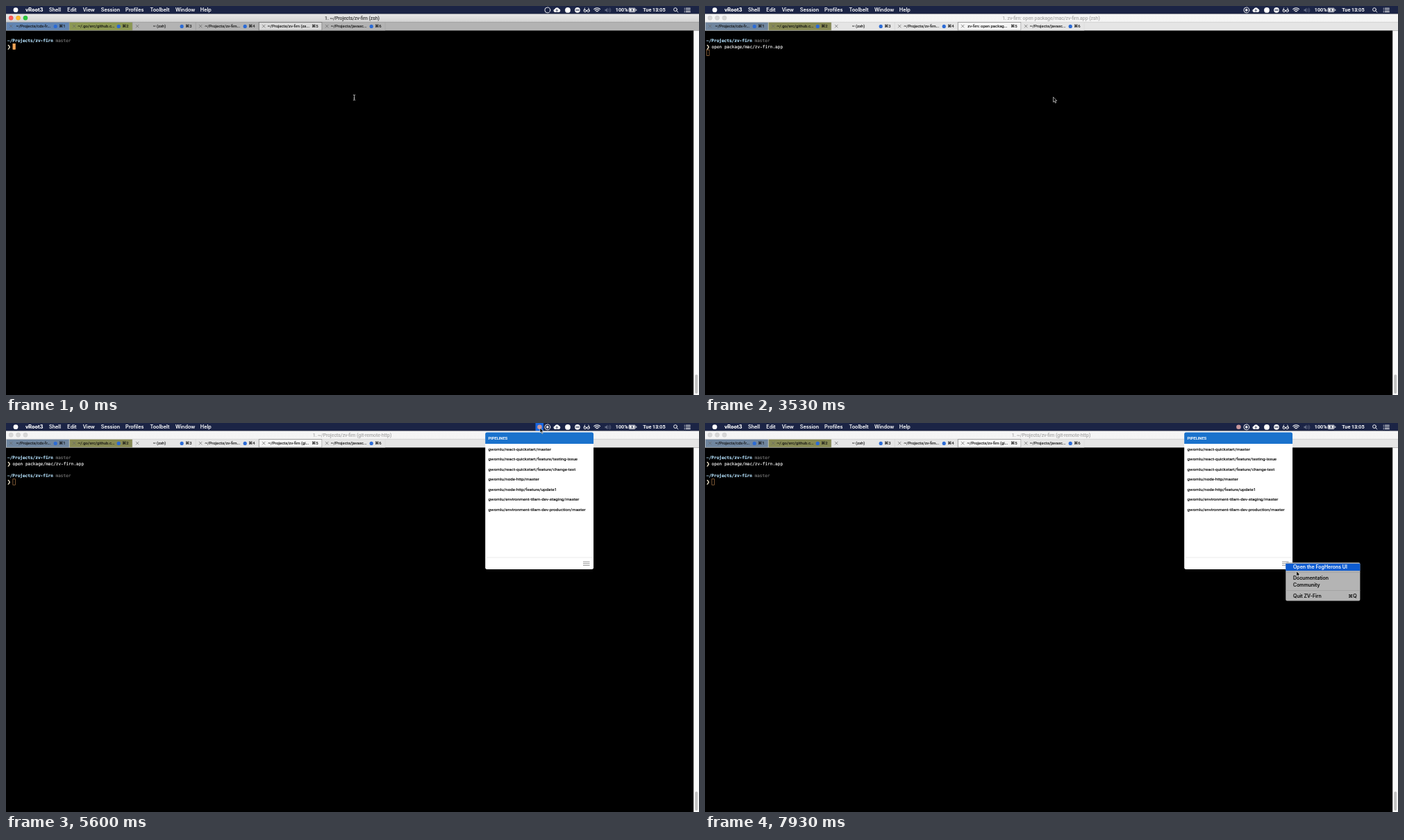
An HTML page for the animation above (8000 ms loop, 998 px wide and 561 px high).

```html
<!DOCTYPE html>
<html lang="en">
<head>
<meta charset="utf-8">
<title>Terminal and tray menu</title>
<style>
  html, body { margin: 0; width: 100%; height: 100%; overflow: hidden; background: #000; }
  svg {
    display: block; width: 100%; height: 100%;
    --bar: #b3b3b3; --selected: #dadada; --edge: #777; --blue: #6285b2; --olive: #8c9853;
    --ink: #303030; --title-top: #e9e9e9; --title-end: #d2d2d2; --gap: #999;
  }
  svg.blur {
    --bar: #e5e5e5; --selected: #f5f5f5; --edge: #999; --blue: #70869f; --olive: #878a55;
    --ink: #a5a5a5; --title-top: #f6f6f6; --title-end: #f4f4f4; --gap: #d0d0d0;
  }
  text { white-space: pre; stroke-width: .14; }
  .menu { font: 500 7.28px Inter, sans-serif; fill: #fff; }
  .menu text { stroke: #fff; }
  .status { font-family: Roboto, sans-serif; }
  .title { font: 6.9px Roboto, sans-serif; fill: var(--ink); stroke: var(--ink); text-anchor: middle; }
  .tabs { font: 5.9px Roboto, "DejaVu Sans", sans-serif; fill: #161616; }
  .tabs text { stroke: #161616; }
  .tabs .label { text-anchor: middle; }
  .term { font: 6.08px "DejaVu Sans Mono", monospace; fill: #eee; stroke: #eee; }
  .path { font-weight: bold; fill: #b4e0fb; stroke: #b4e0fb; }
  .branch { fill: #777; stroke: #777; }
  .mark { font: bold 6.6px "DejaVu Sans", sans-serif; fill: #f4ead2; stroke: #f4ead2; }
  .list { font: 6.24px Roboto, sans-serif; fill: #000; stroke: #000; }
  .popup { font: 500 7px Inter, "DejaVu Sans", sans-serif; fill: #0c0c0c; }
  .popup text { stroke: currentColor; fill: currentColor; color: #0c0c0c; }
  .light { stroke-width: .4; }
  .blur .light { fill: #d8d8d8; stroke: #c4c4c4; }
  #caret { fill: #f2a456; stroke: #f2a456; stroke-width: .6; }
  .blur #caret { fill: none; stroke: #c98d55; }
  .line { fill: none; stroke: #fff; stroke-width: .9; stroke-linecap: round; }
</style>
</head>
<body>
<svg id="stage" viewBox="0 0 998 561" preserveAspectRatio="none">
  <defs>
    <linearGradient id="titleFill" x2="0" y2="1">
      <stop stop-color="var(--title-top)"/><stop offset="1" stop-color="var(--title-end)"/>
    </linearGradient>
  </defs>
  <rect width="998" height="561"/>

  <g id="menubar" class="menu">
    <rect width="998" height="11.5" fill="#1b2445"/>
    <circle cx="14" cy="5.7" r="3.4"/>
    <rect x="762.5" width="11.5" height="11.5" fill="#1764dc" data-on="5470 5670"/>
    <circle cx="768.5" cy="5.8" r="3.3" fill="#c9979c" data-on="3900 8000"/>
    <circle class="line" cx="779.8" cy="5.9" r="3.9"/>
    <circle id="record" cx="779.8" cy="5.9" r="1.8"/>
    <path d="M790.5 9a2.3 2.3 0 0 1-.3-4.5 3.4 3.4 0 0 1 6.3-.4A2.5 2.5 0 0 1 796.2 9z"/>
    <path d="M793.3 8.6V5.2M791.8 6.6l1.5-1.5 1.5 1.5" fill="none" stroke="#1b2445" stroke-width=".9"/>
    <circle cx="809" cy="5.9" r="3.9"/>
    <circle cx="823" cy="5.9" r="3.8"/>
    <rect x="820.4" y="5" width="5.2" height="1.7" fill="#596078"/>
    <g class="line">
      <circle cx="833.9" cy="7" r="1.7"/><circle cx="838.5" cy="7" r="1.7"/>
      <path d="M832.3 6l1.3-3M840.1 6l-1.3-3M835.6 6.6h1.2"/>
      <path d="M846.8 4.6a6.2 6.2 0 0 1 8.8 0M848.4 6.3a4 4 0 0 1 5.6 0M850 7.9a1.8 1.8 0 0 1 2.4 0" stroke-width="1.1"/>
      <g stroke="#626a84"><path d="M868 4a3 3 0 0 1 0 4M869.7 3a4.5 4.5 0 0 1 0 6"/></g>
      <rect x="897.1" y="3.2" width="9" height="5.2" rx=".8"/>
      <path d="M907.8 5v1.6"/>
      <circle cx="964" cy="5.1" r="2.4"/><path d="M965.9 7l2 2"/>
      <path d="M977.2 3.2h.2M977.2 5.8h.2M977.2 8.4h.2M979.3 3.2h6M979.3 5.8h6M979.3 8.4h6" stroke-width="1.1"/>
    </g>
    <path d="M862.5 4.7h1.6l2.2-1.9v6.4l-2.2-1.9h-1.6z" fill="#626a84"/>
    <rect x="898" y="4.1" width="7.2" height="3.4"/>
    <path d="M902.4 3l-2.2 3.2h1.5l-.7 2.4 2.4-3.3h-1.6z" fill="#1b2445"/>
  </g>

  <rect y="11.4" width="998" height="12" fill="url(#titleFill)"/>
  <circle class="light" cx="7.2" cy="17.2" r="3.1" fill="#fc5b57" stroke="#df423f"/>
  <circle class="light" cx="17.6" cy="17.2" r="3.1" fill="#fdbc2f" stroke="#dd9d20"/>
  <circle class="light" cx="28" cy="17.2" r="3.1" fill="#2bc840" stroke="#1da72f"/>
  <text id="title" class="title" x="498.5" y="19.6"></text>
  <rect y="23.1" width="998" height="12.3" fill="var(--bar)"/>
  <path d="M0 23.2H998" stroke="var(--gap)" stroke-width=".5"/>
  <g id="tabs" class="tabs"></g>

  <g id="term" class="term"></g>
  <rect id="caret" width="3.6" height="8.4"/>
  <text class="term" x="9.6" y="60.7" style="fill:#4a2d10;stroke:none" data-on="2330 2930">o</text>

  <rect x="990.2" y="35.4" width="7.8" height="526" fill="#fafafa"/>
  <rect x="992.2" y="531.5" width="4" height="27.5" rx="2" fill="#c2c2c2"/>

  <g data-on="5600 8000">
    <rect x="690.2" y="13.5" width="155.9" height="197.4" rx="2.6" fill="#fff"/>
    <path d="M690.2 30V16.1a2.6 2.6 0 0 1 2.6-2.6H843.5a2.6 2.6 0 0 1 2.6 2.6V30z" fill="#1a72cc"/>
    <text x="694.5" y="24.3" style="font:500 5.72px Roboto,sans-serif" fill="#fff" stroke="#fff">PIPELINES</text>
    <g id="list" class="list"></g>
    <path d="M690.2 194H846.1" stroke="#e4e4e4" stroke-width=".7"/>
    <path d="M831 200.2h9.6M831 202.8h9.6M831 205.4h9.6" stroke="#888" stroke-width=".9"/>
  </g>

  <g class="popup" data-on="7530 8000">
    <rect x="836.3" y="201.2" width="107.1" height="55.4" rx="2" fill="#b4b4b4"/>
    <rect x="836.3" y="202.8" width="107.1" height="10.3" fill="#0d5bd0" data-on="7870 8000"/>
    <path d="M836.5 215.4H943.3M836.5 241.5H943.3" stroke="#a0a0a0" stroke-width=".8"/>
    <text id="first" x="847" y="210">Open the FogHerons UI</text>
    <text x="847" y="226">Documentation</text>
    <text x="847" y="236">Community</text>
    <text x="847" y="252">Quit ZV-Firn</text>
    <text x="926.3" y="252">⌘Q</text>
  </g>

  <g id="mouse">
    <path id="arrow" d="M0 0V7.3L1.7 5.8 2.9 8.6 4.1 8.1 2.9 5.4H5.2Z" fill="#000" stroke="#fff" stroke-width=".6"/>
    <path id="beam" d="M-1.6-3.9Q0-3.9 0-2.8Q0-3.9 1.6-3.9M0-2.8V2.8M-1.6 3.9Q0 3.9 0 2.8Q0 3.9 1.6 3.9M-.9 1H.9" fill="none" stroke="#ddd" stroke-width=".8"/>
  </g>
</svg>

<script>
const LOOP = 8000, FRAME = 200 / 3, CELL = 3.66;
const $ = id => document.getElementById(id);
const stage = $('stage');
const add = (id, markup) => $(id).insertAdjacentHTML('beforeend', markup);
const text = (x, y, content, attrs = '') => `<text x="${x}" y="${y}" ${attrs}>${content}</text>`;

[[28, 'vRoot3', 'font-weight="700"'], [62, 'Shell'], [88.3, 'Edit'], [110.7, 'View'],
 [136.7, 'Session'], [172, 'Profiles'], [207.5, 'Toolbelt'], [244, 'Window'], [279.8, 'Help'],
 [877.8, '100%', 'class="status"'], [917.2, 'Tue 13:05', 'class="status"']]
  .forEach(([x, label, attrs]) => add('menubar', text(x, 8.4, label, attrs)));

// label, label centre, fill
[['~/Projects/cdx-fr...', 39.3, '--blue'], ['~/.go/src/github.c...', 130, '--olive'],
 ['~ (zsh)', 221, '--bar'], ['~/Projects/zv-firn...', 311.7, '--bar'],
 ['', 406.8, '--selected'], ['~/Projects/javasc...', 493.6, '--bar']]
  .forEach(([label, centre, fill], i) => {
    const x = i * 91, open = i === 4;
    const edge = open ? 'var(--edge)' : 'var(--gap)';
    add('tabs', `<rect x="${x + .3}" y="23.5" width="90.7" height="11.6" fill="var(${fill})" stroke="${edge}" stroke-width="${open ? .9 : .4}"/>
      <path d="M${x + 5} 26.9l4.4 4.4m0-4.4l-4.4 4.4" stroke="#666" stroke-width=".7"/>`
      + text(centre, 31.2, label, `class="label" ${open ? 'id="tabLabel"' : ''}`)
      + (open ? '' : `<circle cx="${x + 71.2}" cy="29.4" r="2.6" fill="#2b6bd6"/>`)
      + text(x + 76.3, 31.3, '⌘' + (i + 1)));
  });

const prompt = (y, on) => `<g data-on="${on}">`
  + text(2, y, '~/Projects/zv-firn', 'class="path"')
  + text(2 + 19 * CELL, y, 'master', 'class="branch"')
  + text(1.6, y + 9, '❯', 'class="mark"') + '</g>';
add('term', prompt(51.9, '0 8000') + prompt(78.3, '3600 8000')
  + text(9.6, 60.7, 'open package/mac/zv-firn.app', 'data-on="2330 8000"')
  + text(2, 69.5, '', 'id="search" data-on="1870 2930"'));

['react-quickstart/master', 'react-quickstart/feature/testing-issue',
 'react-quickstart/feature/change-text', 'node-http/master', 'node-http/feature/update1',
 'environment-tilam-dev-staging/master', 'environment-tilam-dev-production/master']
  .forEach((branch, i) => add('list', text(694.5, 39.5 + i * 14.56, 'gwomlu/' + branch)));

const ease = {
  in: p => p * p,
  out: p => 1 - (1 - p) ** 2,
  both: p => p * p * (3 - 2 * p)
};
// time, x, y, easing towards this point
const route = [
  [0, 501.5, 132], [3530, 501.5, 131.3], [4200, 796.3, 82.5, 'both'], [4400, 796.3, 82.5],
  [5200, 769, 6.8, 'both'], [5830, 769, 6.8], [6330, 760.2, 57, 'in'], [6690, 752, 144, 'out'],
  [7330, 835.5, 202.5, 'both'], [7800, 835.5, 202.5], [7930, 851.8, 213.6, 'out']
];

function mouseAt(t) {
  const i = route.findIndex(key => key[0] > t);
  if (i < 0) return route.at(-1).slice(1, 3);
  const [t0, x0, y0] = route[i - 1], [t1, x1, y1, kind = 'both'] = route[i];
  const p = ease[kind]((t - t0) / (t1 - t0));
  return [x0 + (x1 - x0) * p, y0 + (y1 - y0) * p];
}

// latest value whose start time has passed
const current = (steps, t) => steps.findLast(step => step[0] <= t)[1];
const within = (t, from, to) => t >= from && t < to;

const titles = [[0, '~/Projects/zv-firn (zsh)'], [3000, 'zv-firn: open package/mac/zv-firn.app (zsh)'],
  [3600, '~/Projects/zv-firn (zsh)'], [3800, '~/Projects/zv-firn (git-remote-http)']];
const tabLabels = [[0, '~/Projects/zv-firn (zs...'], [3000, 'zv-firn: open packag...'],
  [3600, '~/Projects/zv-firn (zs...'], [3800, '~/Projects/zv-firn (gi...']];
const searches = [[0, ''], [2330, 'o'], [2400, 'op']];
const carets = [[0, [9.9, 54.3]], [2930, [2.5, 63.2]], [3600, [9.9, 80.8]]];

const timed = [...document.querySelectorAll('[data-on]')]
  .map(node => [node, ...node.dataset.on.split(' ').map(Number)]);
const show = (node, on) => { node.style.display = on ? '' : 'none'; };

function render(t) {
  timed.forEach(([node, from, to]) => show(node, within(t, from, to)));
  const blurred = within(t, 3530, 4400) || t >= 5600;
  stage.classList.toggle('blur', blurred);
  $('title').textContent = '1. ' + current(titles, t);
  $('tabLabel').textContent = current(tabLabels, t);
  $('search').textContent = `bck-i-search: ${current(searches, t)}_`;
  $('first').style.color = t >= 7870 ? '#fff' : '';
  $('record').style.opacity = Math.min(1, Math.max(0, (t - 410) / 320));

  const [cx, cy] = current(carets, t);
  $('caret').setAttribute('x', cx);
  $('caret').setAttribute('y', cy);

  const [x, y] = mouseAt(Math.floor((t + 5) / FRAME) * FRAME);
  const beam = !blurred && y > 36;
  show($('mouse'), !within(t, 1870, 3530));
  show($('beam'), beam);
  show($('arrow'), !beam);
  $('mouse').setAttribute('transform', `translate(${x} ${y})`);
}

let start;
function tick(now) {
  start ??= now;
  render((now - start) % LOOP);
  requestAnimationFrame(tick);
}
render(0);
requestAnimationFrame(tick);
</script>
</body>
</html>
```
